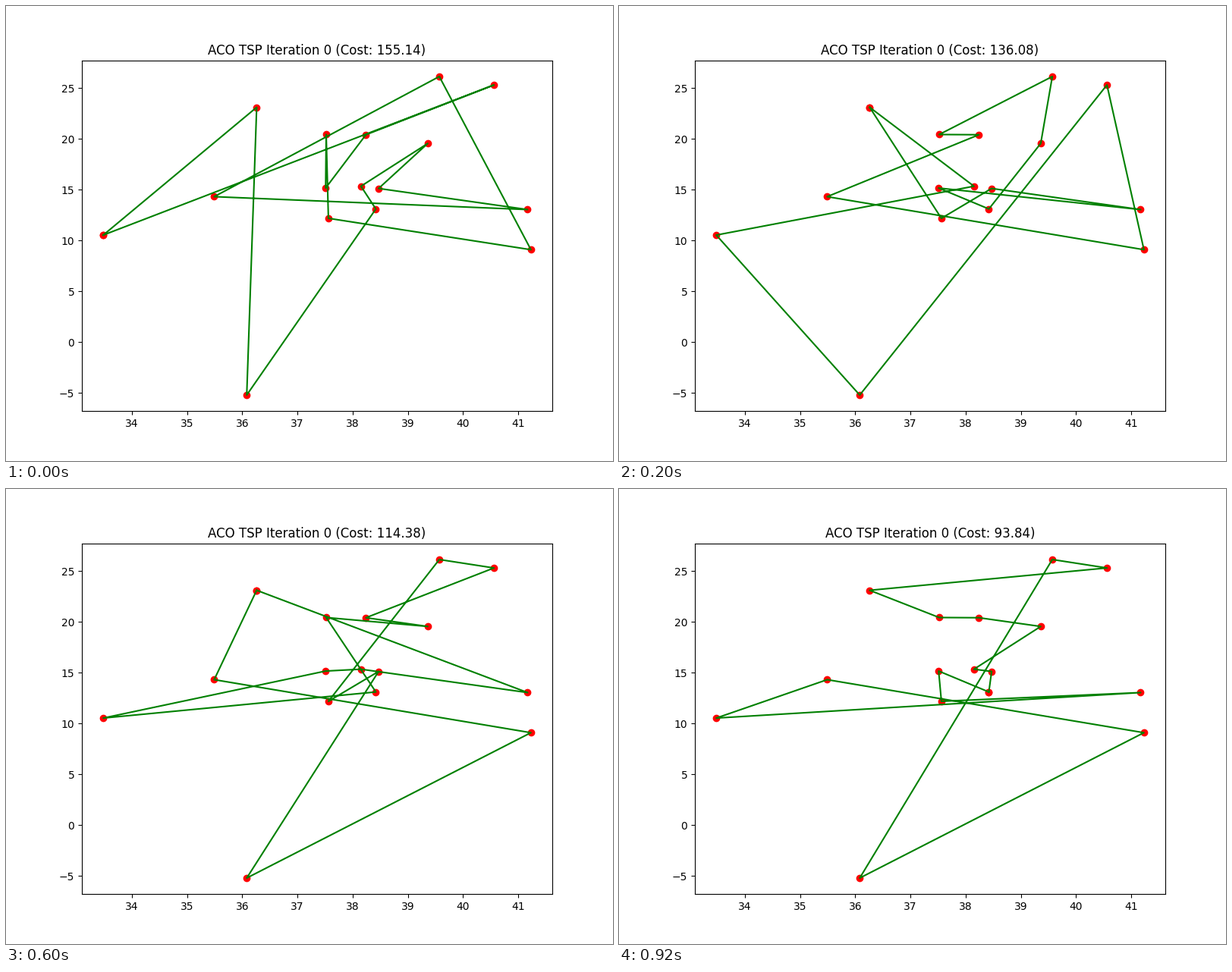
A matplotlib script for the animation above (1 s loop, 800 px wide and 600 px high).

```python
import numpy as np
import matplotlib.pyplot as plt
from matplotlib.animation import FuncAnimation

# Stops of the ulysses16 instance, named A to P.
STOPS = dict(
    A=(38.24, 20.42), B=(39.57, 26.15), C=(40.56, 25.32), D=(36.26, 23.12),
    E=(33.48, 10.54), F=(37.56, 12.19), G=(38.42, 13.11), H=(37.52, 20.44),
    I=(41.23, 9.10), J=(41.17, 13.05), K=(36.08, -5.21), L=(38.47, 15.13),
    M=(38.15, 15.35), N=(37.51, 15.17), O=(35.49, 14.32), P=(39.36, 19.56),
)

# Each shorter tour the ants find, in order of visit.
TOURS = [
    "EDKGMPLJOBIFHNAC",
    "DFLJNGPBHAOICKEM",
    "OABCLDKINMGEFJPH",
    "DOIKLFBCAPHGENMJ",
    "GLMPAHDCBKIOEJFN",
]


def closed_path(tour):
    return np.array([STOPS[stop] for stop in tour + tour[0]])


def path_length(path):
    return np.hypot(*np.diff(path, axis=0).T).sum()


fig, ax = plt.subplots(figsize=(8, 6), dpi=100)
start = closed_path(TOURS[0])
dots = ax.scatter(*start.T, c="red")
route, = ax.plot(*start.T, color="green")
title = ax.set_title("")


def update(index):
    path = closed_path(TOURS[index])
    dots.set_offsets(path)
    route.set_data(*path.T)
    title.set_text(f"ACO TSP Iteration 0 (Cost: {path_length(path):.2f})")
    return dots, route, title


anim = FuncAnimation(fig, update, frames=len(TOURS), interval=200,
                     repeat=True, repeat_delay=0)
plt.show()
```
